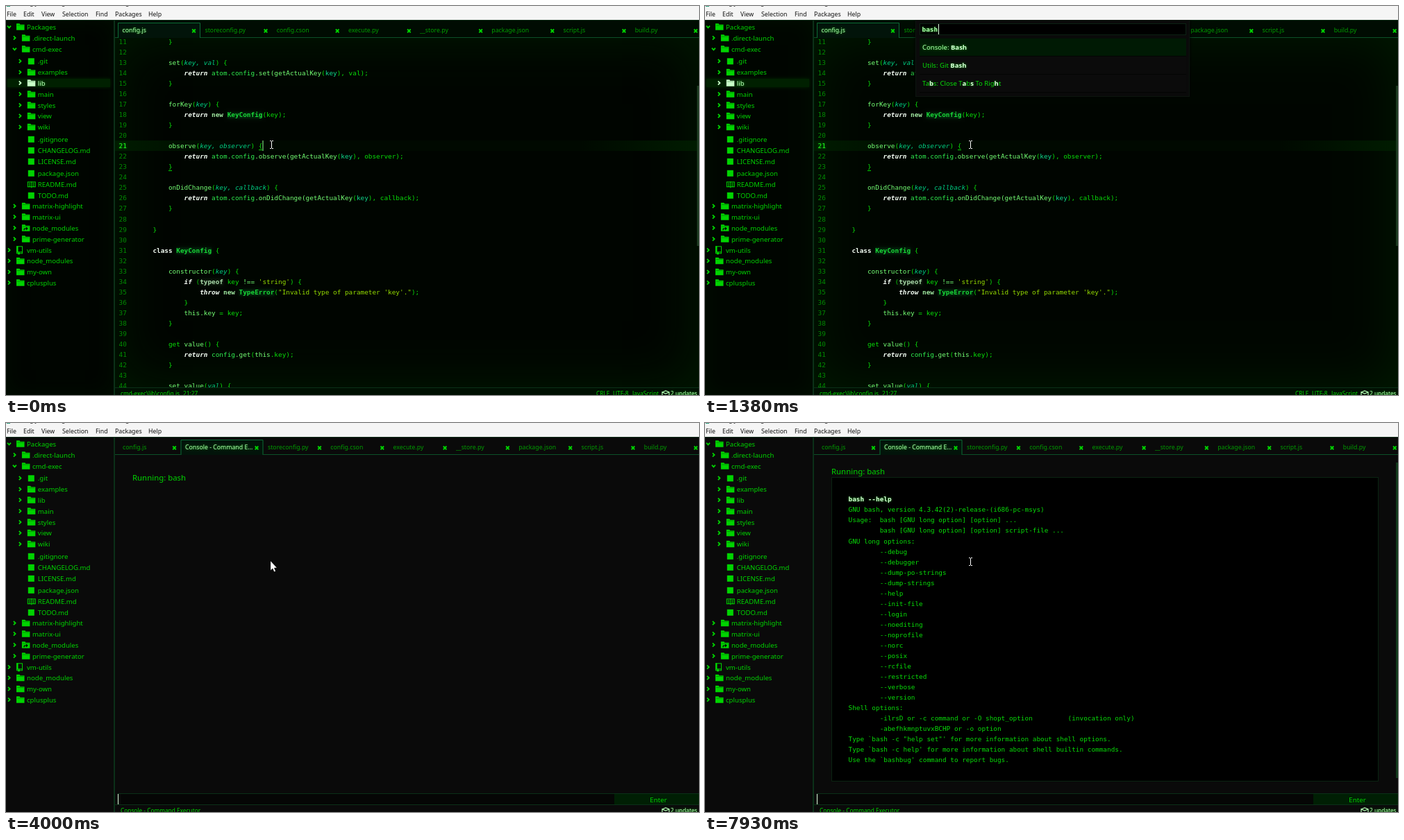
Animation, 998 px wide and 561 px high, one loop 8 s. Source, as an HTML page with a canvas:

```html
<!DOCTYPE html>
<html lang="en">
<head>
<meta charset="utf-8">
<title>Editor console</title>
<style>
html, body { margin: 0; width: 100%; height: 100%; overflow: hidden; background: #000; }
canvas { display: block; }
</style>
</head>
<body>
<canvas id="stage" width="998" height="561"></canvas>
<script>
const g = document.getElementById('stage').getContext('2d', { alpha: false });
const UI = '"Noto Sans", "Open Sans", sans-serif';
const MONO = '"DejaVu Sans Mono", monospace';
const ARIAL = '"Liberation Sans", Arial, sans-serif';
const GREEN = '#00d400', PALE = '#b4ffb4', EDGE = '#0b3018';
const LOOP = 8000;

// Style letters used after "~" in marked-up text
const STYLES = {
  g: { color: '#08dc08' },
  m: { color: '#74ff74' },
  d: { color: '#30f050' },
  v: { color: '#10d88c' },
  i: { color: '#00cc80', font: 'italic' },
  r: { color: '#f4fff4', font: 'italic bold' },
  c: { color: '#f4fff4', font: 'bold' },
  n: { color: '#a0e8a0', font: 'bold' },
  k: { color: '#18d838', font: 'bold', back: '#03200a' },
  t: { color: '#a8d8a8', font: 'bold', back: '#0a160a' },
  s: { color: '#94dc00' },
  p: { color: PALE, glow: 1 },
  b: { color: '#dcffdc', font: 'bold', glow: 1 }
};

const CODE = [
  '    }', '',
  '    ~mset~g(~ikey, val~g) {',
  '        ~rreturn~d atom.config~m.set(getActualKey~g(~vkey~g), val);',
  '    }', '',
  '    ~mforKey~g(~ikey~g) {',
  '        ~rreturn~g ~nnew~g ~kKeyConfig~g(key);',
  '    }', '',
  '    ~mobserve~g(~ikey, observer~g) {',
  '        ~rreturn~d atom.config~m.observe(getActualKey~g(~vkey~g), observer);',
  '    }', '',
  '    ~monDidChange~g(~ikey, callback~g) {',
  '        ~rreturn~d atom.config~m.onDidChange(getActualKey~g(~vkey~g), callback);',
  '    }', '', '}', '',
  '~cclass~g ~kKeyConfig~g {', '',
  '    ~mconstructor~g(~ikey~g) {',
  '        ~rif~g (~ttypeof~g key ~m!==~g ~s\'string\'~g) {',
  '            ~rthrow~g ~nnew~g ~kTypeError~g(~s"Invalid type of parameter \'key\'."~g);',
  '        }',
  '        ~mthis.key~g = key;',
  '    }', '',
  '    get ~mvalue~g() {',
  '        ~rreturn~d config~m.get~g(~mthis~g.key);',
  '    }', '',
  '    ~mset value~g(~ival~g) {'
];

// label, depth, icon, centre y, open state (1 open, 0 closed, none for files)
const TREE = [
  ['Packages', 0, 'folder', 30, 1], ['.direct-launch', 1, 'folder', 46, 0],
  ['cmd-exec', 1, 'folder', 62, 1], ['.git', 2, 'square', 79.5, 0],
  ['examples', 2, 'folder', 95.5, 0], ['lib', 2, 'folder', 111, 0],
  ['main', 2, 'folder', 127, 0], ['styles', 2, 'folder', 143, 0],
  ['view', 2, 'folder', 158.5, 0], ['wiki', 2, 'folder', 174.5, 0],
  ['.gitignore', 2, 'square', 192], ['CHANGELOG.md', 2, 'square', 208],
  ['LICENSE.md', 2, 'square', 224], ['package.json', 2, 'square', 241],
  ['README.md', 2, 'book', 257], ['TODO.md', 2, 'square', 273],
  ['matrix-highlight', 1, 'folder', 288.5, 0], ['matrix-ui', 1, 'folder', 304, 0],
  ['node_modules', 1, 'link', 320, 0], ['prime-generator', 1, 'folder', 336, 0],
  ['vm-utils', 0, 'repo', 352, 0], ['node_modules', 0, 'folder', 367.5, 0],
  ['my-own', 0, 'folder', 383.5, 0], ['cplusplus', 0, 'folder', 399, 0]
];

const TABS = ['storeconfig.py', 'config.cson', 'execute.py', '__store.py',
  'package.json', 'script.js', 'build.py'];

const COMMANDS = [
  ['Bookmarks: View All', 'Ctrl+F2'], ['Bracket Matcher: Close Tag', 'Ctrl+Alt+.'],
  ['Bookmarks: Clear Bookmarks', 'Ctrl+Shift+F2'], ['Bookmarks: Toggle Bookmark', 'Ctrl+Alt+F2'],
  ['Bookmarks: Jump To Next Bookmark', 'F2'], ['Bookmarks: Jump To Previous Bookmark', 'Shift+F2'],
  ['Bracket Matcher: Go To Matching Bracket', 'Ctrl+M'],
  ['Bracket Matcher: Select Inside Brackets', 'Ctrl+Alt+M'],
  ['Bracket Matcher: Go To Enclosing Bracket'],
  ['Bracket Matcher: Remove Matching Brackets', 'Ctrl+Alt+Backspace']
];
const MATCHES = ['Console: ~bBash', 'Utils: Git ~bBash', 'Ta~bb~gs: Close T~ba~gb~bs~g To Rig~bh~gt'];

const TAB = '        ';
const OUTPUT = [
  '~bbash --help',
  'GNU bash, version 4.3.42(2)-release-(i686-pc-msys)',
  'Usage:  bash [GNU long option] [option] ...',
  TAB + 'bash [GNU long option] [option] script-file ...',
  'GNU long options:',
  ...('debug debugger dump-po-strings dump-strings help init-file login noediting ' +
    'noprofile norc posix rcfile restricted verbose version').split(' ').map(o => TAB + '--' + o),
  'Shell options:',
  TAB + '-ilrsD or -c command or -O shopt_option' + TAB + ' (invocation only)',
  TAB + '-abefhkmnptuvxBCHP or -o option',
  'Type `bash -c "help set"\' for more information about shell options.',
  'Type `bash -c help\' for more information about shell builtin commands.',
  'Use the `bashbug\' command to report bugs.'
];

// Typing and blinking schedule, ms
const PALETTE_KEYS = [960, 1110, 1260, 1380];
const CONSOLE_KEYS = [5380, 5380, 5630, 5760, 6190, 6460, 6610, 7130, 7250, 7530, 7650];
const CARET_OFF = [[550, 960], [2890, 3300], [3730, 4000], [4430, 4810], [5240, 5380], [7010, 7130]];
const typed = (text, keys, t) => text.slice(0, keys.filter(k => k <= t).length);

function rect(x, y, w, h, fill) {
  g.fillStyle = fill;
  g.fillRect(x, y, w, h);
}

function frame(x, y, w, h, color) {
  g.strokeStyle = color;
  g.lineWidth = 1;
  g.strokeRect(x + .5, y + .5, w - 1, h - 1);
}

function poly(points, color, width) {
  g.beginPath();
  for (let i = 0; i < points.length; i += 2) g.lineTo(points[i], points[i + 1]);
  if (width) {
    g.strokeStyle = color;
    g.lineWidth = width;
    g.stroke();
  } else {
    g.fillStyle = color;
    g.fill();
  }
}

function clipped(x, y, w, h, draw) {
  g.save();
  g.beginPath();
  g.rect(x, y, w, h);
  g.clip();
  draw();
  g.restore();
}

function innerGlow(x, y, w, h, blur, color) {
  clipped(x, y, w, h, () => {
    g.shadowColor = color;
    g.shadowBlur = blur;
    g.fillStyle = color;
    g.beginPath();
    g.rect(x - 100, y - 100, w + 200, h + 200);
    g.rect(x, y, w, h);
    g.fill('evenodd');
  });
}

// Horizontal band, bright at both ends and faint in the middle
function band(x, y, w, h, ends, middle) {
  const fill = g.createLinearGradient(x, 0, x + w, 0);
  [[0, ends], [.2, middle], [.8, middle], [1, ends]].forEach(([at, c]) => fill.addColorStop(at, c));
  rect(x, y, w, h, fill);
}

function text(str, x, y, size, color, family = UI, glow = 0, font = '') {
  g.font = `${font} ${size}px ${family}`;
  g.fillStyle = color;
  g.shadowColor = 'rgba(0,255,0,.6)';
  g.shadowBlur = glow ? 3 : 0;
  g.fillText(str, x, y);
  g.shadowBlur = 0;
  return g.measureText(str).width;
}

function marked(str, x, y, size, family = UI, base = 'g') {
  ('~' + base + str).split('~').slice(1).forEach(part => {
    const s = STYLES[part[0]], run = part.slice(1);
    g.font = `${s.font || ''} ${size}px ${family}`;
    if (s.back) {
      g.shadowColor = s.back;
      g.shadowBlur = 5;
      rect(x, y - 7, g.measureText(run).width, 9, s.back);
      g.shadowBlur = 0;
    }
    x += text(run, x, y, size, s.color, family, s.glow, s.font);
  });
}

function folder(x, y, color) {
  poly([x, y - 5, x + 4.5, y - 5, x + 5.5, y - 3.5, x + 11.5, y - 3.5, x + 11.5, y + 4.5, x, y + 4.5], color);
  rect(x + 1, y - 2.6, 9.5, .7, 'rgba(0,40,0,.5)');
}

function icon(kind, x, y, color) {
  if (kind === 'square') rect(x + 1, y - 4.5, 9, 9, color);
  else if (kind === 'book') {
    frame(x, y - 4, 12, 8, color);
    rect(x + 5.5, y - 4, 1, 9, color);
    for (let i = -2; i < 3; i += 2) {
      rect(x + 2, y + i, 2.5, 1, color);
      rect(x + 7.5, y + i, 2.5, 1, color);
    }
  } else if (kind === 'repo') {
    frame(x, y - 6, 9, 11, color);
    rect(x, y - 6, 2.5, 9, color);
    rect(x, y + 2, 9, 1, color);
    rect(x + 2, y + 3, 3, 3, color);
  } else {
    folder(x, y, color);
    if (kind === 'link') {
      poly([x + 3, y + 3, x + 3.5, y + .8, x + 7, y + .8], '#001000', 1.4);
      poly([x + 6, y - 1.8, x + 9, y + .8, x + 6, y + 3.2], '#001000');
    }
  }
}

function sidebar(editing) {
  rect(0, 20, 155, 541, editing ? '#000500' : '#0a0a0a');
  if (editing) innerGlow(0, 20, 155, 541, 30, '#000e00');
  for (const [label, depth, kind, y, open] of TREE) {
    const x = depth * 7.9, selected = editing && label === 'lib';
    if (selected) {
      g.shadowColor = '#002400';
      g.shadowBlur = 5;
      rect(2, y - 6, 148, 12, '#002000');
      g.shadowBlur = 0;
    }
    const color = selected ? '#c8ffc8' : GREEN;
    if (open) poly([x + 2, y - 1.3, x + 4.5, y + 1.4, x + 7, y - 1.3], color, 1.8);
    else if (open === 0) poly([x + 3, y - 2.7, x + 5.7, y, x + 3, y + 2.7], color, 1.8);
    icon(kind, x + 15, y + .3, color);
    text(label, x + 30, y + 3.6, 9.6, color, UI, selected);
  }
}

function cross(x) {
  poly([x - 2.3, 33.5, x + 2.3, 38.3], GREEN, 1.9);
  poly([x + 2.3, 33.5, x - 2.3, 38.3], GREEN, 1.9);
}

function tab(label, x, closeX) {
  text(label, x, 38.3, 8.75, '#009c00');
  cross(closeX);
}

function activeTab(label, x, w) {
  rect(x, 24, w, 22, '#02140a');
  poly([x + .5, 46, x + .5, 24.5, x + w - .5, 24.5, x + w - .5, 46], '#0c6a35', 1);
  text(label, x + 6.5, 38.3, 8.75, PALE, UI, 1);
  cross(x + w - 9.5);
}

function tabs(editing) {
  rect(157, 20, 841, 26, editing ? '#000c02' : '#0a0a0a');
  rect(157, 45, 841, 1, '#0b5028');
  if (editing) activeTab('config.js', 161, 119);
  else {
    tab('config.js', 168, 242.5);
    activeTab('Console - Command E...', 251.5, 119);
  }
  const first = editing ? 286.5 : 377, pitch = editing ? 103.2 : 90.3;
  TABS.forEach((label, i) => tab(label, first + i * pitch, first + i * pitch + (editing ? 87.5 : 74.5)));
}

function menu() {
  rect(0, 0, 998, 20, '#f5f5f5');
  rect(1, 0, 5, 1, '#30a080');
  text('config.js - Packages - cmd-exec - editing', 14, -1, 8.8, '#222');
  [['File', 1], ['Edit', 25], ['View', 51], ['Selection', 81], ['Find', 129], ['Packages', 157], ['Help', 205]]
    .forEach(([label, x]) => text(label, x, 15.2, 8.8, '#111'));
}

function status(editing) {
  rect(157, 550, 841, 11, editing ? '#001002' : '#0a0a0a');
  rect(157, 550, 841, 1, EDGE);
  if (editing) {
    [['cmd-exec\\lib\\config.js', 165], ['21:27', 255], ['CRLF', 850], ['UTF-8', 874], ['JavaScript', 902]]
      .forEach(([label, x]) => text(label, x, 562.3, 8.3, GREEN));
  } else text('Console - Command Executor', 165, 562.3, 8.3, GREEN);
  poly([945, 557, 950, 555, 955, 557, 955, 562, 945, 562, 945, 557, 950, 559, 955, 557], PALE, 1.2);
  text('2 updates', 957, 562.3, 8.3, PALE, UI, 1);
}

function editor(caret) {
  rect(157, 46, 841, 504, '#000500');
  innerGlow(157, 46, 841, 504, 80, '#001a00');
  band(157, 194, 838, 15, '#001c00', '#000900');
  clipped(157, 46, 841, 504, () => CODE.forEach((line, i) => {
    const n = 11 + i, y = 55 + i * 15.03;
    text(n, 162.5, y, 9.38, n === 21 ? '#20ff20' : '#008c00', MONO, n === 21);
    marked(line, 211.4, y, 9.38, MONO);
  }));
  rect(364, 207, 5, 1, GREEN);
  rect(234, 237, 5, 1, GREEN);
  rect(995, 115, 3, 231, '#1c3a20');
  if (caret) rect(369.5, 194, 1, 15, '#8cff8c');
}

function palette(t, caret) {
  const short = t >= 1380, bottom = short ? 131 : 299;
  clipped(290, 20, 420, 300, () => {
    g.shadowColor = '#000';
    g.shadowBlur = 6;
    rect(303, 20, 395, bottom - 20, '#0a0a0a');
  });
  frame(303, 20, 395, bottom - 20, '#0c150e');
  rect(309, 25, 384, 17, '#000');
  frame(309, 25, 384, 17, '#0c2213');
  const input = typed('bash', PALETTE_KEYS, t);
  text(input, 312.5, 36.8, 9.38, PALE, MONO, 1, 'bold');
  if (caret) rect(Math.round(313 + input.length * 5.65), 26, 1, 15, '#e0ffe0');

  const width = short ? 384 : 376;
  clipped(309, 46, 384, bottom - 51, () => {
    (short ? MATCHES : COMMANDS).forEach((item, i) => {
      const y = 59.7 + i * 26.1, on = i === 0, base = on ? 'p' : 'g';
      rect(309, y - 13, width, 25.2, on ? '#001a04' : '#0b0b0b');
      rect(309, y + 12.2, width, 1, '#030403');
      if (short) return marked(item, 313, y + 3.5, 9.55, UI, base);
      const [label, keys] = item;
      marked(t < 1110 ? label : `~b${label[0]}~${base}${label.slice(1)}`, 313, y + 3.5, 9.55, UI, base);
      if (!keys) return;
      g.font = `9.5px ${ARIAL}`;
      const w = g.measureText(keys).width;
      rect(675 - w, y - 7, w + 5.5, 14, '#283028');
      frame(Math.round(675 - w), Math.round(y - 7), Math.round(w + 5.5), 14, '#394239');
      text(keys, 678 - w, y + 3.4, 9.5, on ? '#c8f0c8' : '#00b400', ARIAL);
    });
    if (!short) {
      rect(685, 46, 8, 250, '#0e100e');
      rect(686, 47, 6, 26, '#3a403a');
    }
  });
}

function consoleView(t, caret) {
  const done = t >= 7930;
  rect(157, 46, 841, 504, '#0a0a0a');
  text('Running: bash', 182, done ? 73.6 : 83, 11.4, GREEN);
  if (done) {
    rect(182, 78, 788, 439, '#000');
    frame(182, 78, 788, 439, '#0a2412');
    OUTPUT.forEach((line, i) => marked(line, 206.5, 113.4 + i * 15.03, 9.38, MONO));
    rect(995, 57, 3, 455, '#123a1c');
  }
  rect(161, 534, 715, 16, '#050605');
  rect(161, 534, 837, 1, EDGE);
  rect(876, 535, 122, 15, '#001f04');
  text('Enter', 927.3, 547, 9.7, GREEN);
  const input = done ? '' : typed('bash --help', CONSOLE_KEYS, t);
  text(input, 161.5, 546, 9.38, PALE, MONO, 1, 'bold');
  if (caret) rect(Math.round(161 + input.length * 5.65), 535, 1, 15, '#e0ffe0');
}

function pointer(arrow) {
  if (arrow) {
    const shape = [381, 199, 381, 212.5, 384, 209.8, 386.2, 214.6, 388.2, 213.7, 386.2, 209, 390, 208.8, 381, 199];
    poly(shape, '#fff');
    poly(shape, 'rgba(0,0,0,.5)', .5);
  } else {
    rect(382, 195, 1, 10, '#fff');
    for (const y of [194, 205]) {
      rect(380, y, 2, 1, '#fff');
      rect(383, y, 2, 1, '#fff');
    }
  }
}

function draw(t) {
  const editing = t < 2490, searching = t >= 280 && t < 1930;
  const caret = !CARET_OFF.some(([a, b]) => t >= a && t < b);
  menu();
  sidebar(editing);
  tabs(editing);
  if (editing) editor(!searching);
  else consoleView(t, caret);
  status(editing);
  rect(155, 20, 2, 541, EDGE);
  rect(0, 20, 998, 1, '#0a2814');
  if (searching) palette(t, caret);
  pointer((t >= 280 && t < 1380) || (t >= 2490 && t < 7930));
}

// Redraw only when a scheduled moment has passed
const MOMENTS = [280, 1930, 2490, 7930, ...PALETTE_KEYS, ...CONSOLE_KEYS, ...CARET_OFF.flat()];
const start = performance.now();
let shown = -1;
function tick() {
  const t = (performance.now() - start) % LOOP;
  const step = MOMENTS.filter(m => m <= t).length;
  if (step !== shown) {
    shown = step;
    draw(t);
  }
  requestAnimationFrame(tick);
}
tick();
</script>
</body>
</html>
```
